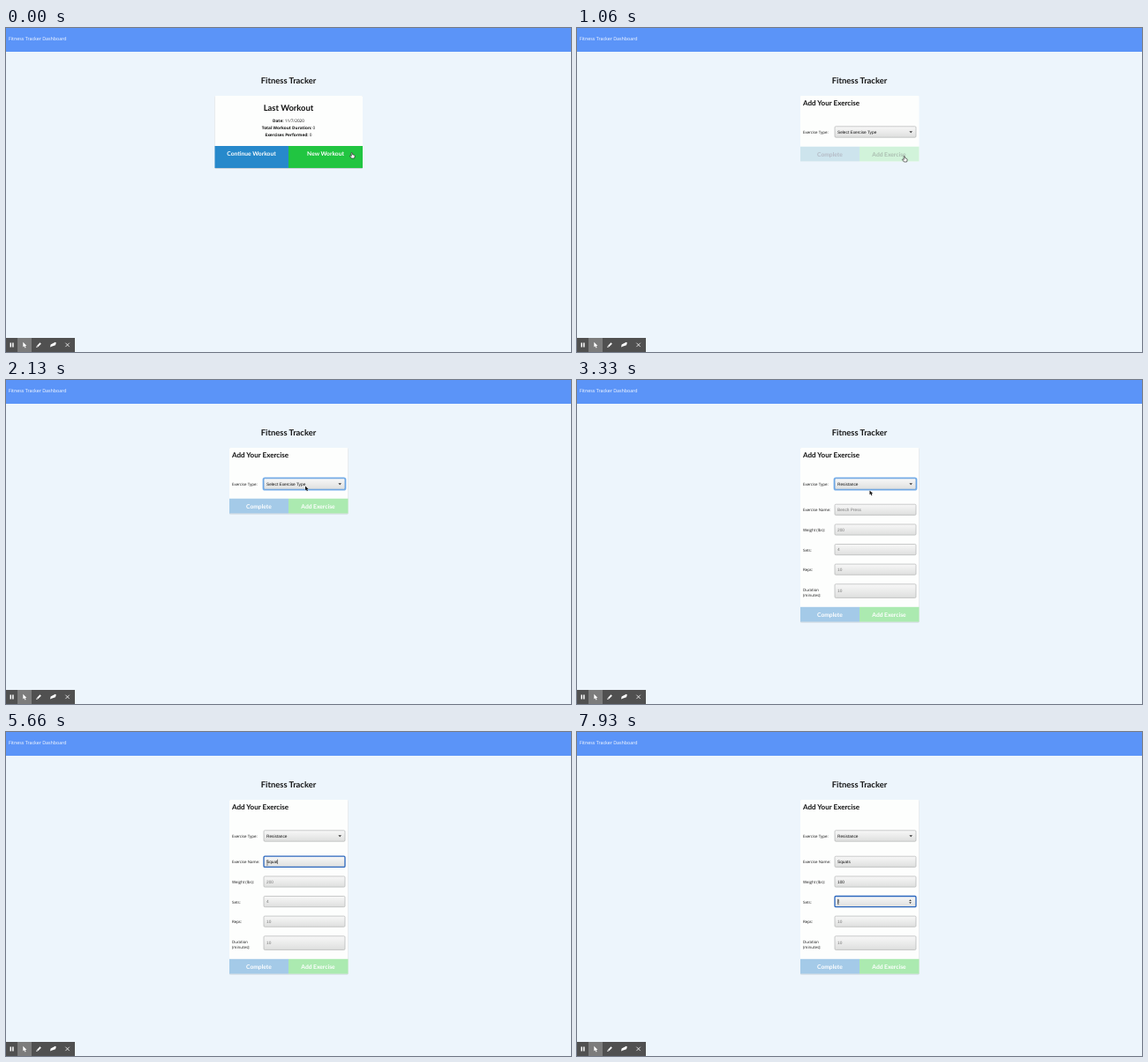
Recreate the animation shown at these times as an HTML page. Size 640 px wide and 368 px high, loop 8 s.

```html
<!DOCTYPE html>
<html lang="en">
<head>
<meta charset="utf-8">
<title>Fitness Tracker</title>
<style>
  html, body { margin: 0; width: 100%; height: 100%; overflow: hidden; background: #edf5fc; }
  svg { display: block; width: 640px; height: 368px; }
  text { font-family: "Open Sans", sans-serif; text-rendering: geometricPrecision; white-space: pre; }
  .head { font-family: Lato, sans-serif; font-weight: 700; fill: #111; }
  .button { font-family: Lato, sans-serif; font-weight: 700; font-size: 6.7px; text-anchor: middle; fill: #fff; }
  .field { font-family: "Liberation Sans", Arial, sans-serif; font-size: 4.75px; }
  .label { font-size: 4.4px; fill: #111; }
  .info { font-size: 4.7px; text-anchor: middle; fill: #111; }
  .bold { font-weight: 700; }
</style>
</head>
<body>
<svg id="stage" viewBox="0 0 640 368">
  <defs>
    <linearGradient id="inputFill" x1="0" y1="0" x2="0" y2="1">
      <stop offset="0" stop-color="#f8f8f8"/><stop offset="1" stop-color="#dedfde"/>
    </linearGradient>
    <filter id="shadow" x="-10%" y="-10%" width="120%" height="125%">
      <feDropShadow dx="0" dy="0.5" stdDeviation="0.7" flood-color="#8c949c" flood-opacity="0.75"/>
    </filter>
  </defs>
  <rect width="640" height="368" fill="#edf5fc"/>
  <rect width="640" height="27" fill="#5b94f8"/>
  <text x="3" y="13.9" font-size="5.33" fill="#fff">Fitness Tracker Dashboard</text>
  <text class="head" x="320" y="62.8" font-size="9.4" text-anchor="middle">Fitness Tracker</text>
  <g id="summary"></g>
  <g id="form"></g>
  <g id="toolbar">
    <rect y="352" width="78" height="16" fill="#505050"/>
    <rect x="13" y="352" width="16" height="16" fill="#7c7c7c"/>
    <path d="M5.3 357.6v4.8M7.9 357.6v4.8" stroke="#fff" stroke-width="1.5"/>
    <path d="M19.3 356.8v5.6l1.3-1.1 1 2.2 1-.5-1-2.1h1.8z" fill="#fff"/>
    <path d="M35.6 361.6l3.6-3.6" stroke="#fff" stroke-width="1.8"/>
    <path d="M34.2 363l.5-1.8 1.3 1.3z" fill="#fff"/>
    <path d="M50 362.6l.6-3.2 5.2-2.6 1 .8-.8 2.6-4.4 1.6z" fill="#fff"/>
    <path d="M67.4 357.7l4.4 4.4M71.8 357.7l-4.4 4.4" stroke="#fff" stroke-width=".8"/>
  </g>
  <g id="cursor">
    <path id="hand" d="M-.9-3.2q.8-.7 1.2.2l.3 1.8 1.8.5q.9.4.7 1.5l-.5 2.2H-.6L-2.5.6q-.1-.9.9-.6l.9.6z"
      fill="#fff" stroke="#222" stroke-width=".65"/>
    <path id="arrow" d="M0 0v4.7l1.1-.9.8 1.9 1-.4-.8-1.9h1.5z" fill="#111" stroke="#fff" stroke-width=".35"
      paint-order="stroke"/>
    <path id="beam" d="M-.9-2.8q.9 0 .9.6q0-.6.9-.6M0-2.2v4.4M-.9 2.8q.9 0 .9-.6q0 .6.9.6"
      fill="none" stroke="#555" stroke-width=".5"/>
  </g>
</svg>
<script>
const LOOP = 8000, FORM_AT = 1060, CHOSEN_AT = 3330;
const NAME_FOCUS = 4130, WEIGHT_FOCUS = 6260, SETS_FOCUS = 7500;
const $ = id => document.getElementById(id);

function add(parent, tag, attrs, content = '') {
  const node = document.createElementNS('http://www.w3.org/2000/svg', tag);
  for (const key in attrs) node.setAttribute(key, attrs[key]);
  node.textContent = content;
  return parent.appendChild(node);
}
const show = (node, on) => node.setAttribute('display', on ? 'inline' : 'none');
const rect = (parent, x, y, width, height, fill, more = {}) =>
  add(parent, 'rect', { x, y, width, height, fill, ...more });
const text = (parent, cls, x, y, content, more = {}) =>
  add(parent, 'text', { class: cls, x, y, ...more }, content);

// Last workout card
const summary = $('summary');
rect(summary, 236.5, 77, 167.5, 82, '#fdfefd', { rx: 1, filter: 'url(#shadow)' });
text(summary, 'head', 320, 94.4, 'Last Workout', { 'text-anchor': 'middle', 'font-size': 9.4 });
[['Date', '11/7/2020'], ['Total Workout Duration', '0'], ['Exercises Performed', '0']].forEach(([key, value], i) => {
  const line = text(summary, 'info', 320, 106.8 + i * 8, '');
  add(line, 'tspan', { class: 'bold' }, key + ':');
  add(line, 'tspan', {}, ' ' + value);
});
rect(summary, 236.5, 134, 83.5, 25, '#2789cb');
rect(summary, 320, 134, 84, 25, '#21c541');
text(summary, 'button', 278, 145.3, 'Continue Workout');
text(summary, 'button', 362, 145.3, 'New Workout');

// Exercise form
const form = $('form');
const card = rect(form, 253, 77, 134.5, 74.5, '#fdfefd', { rx: 1 });
text(form, 'head', 256, 88.3, 'Add Your Exercise', { 'font-size': 8.05 });

function makeField(parent, y, height, labels, placeholder) {
  const mid = y + height / 2;
  labels.forEach((label, i) => text(parent, 'label', 256, mid + (labels.length > 1 ? .3 : 2.1) + i * 6, label));
  const glow = rect(parent, 291.6, y - .4, 92.8, height + .8, 'none',
    { rx: 1.6, stroke: '#7db4ee', 'stroke-width': 2 });
  const box = rect(parent, 292, y, 92, height, 'url(#inputFill)', { rx: 1.2 });
  const value = text(parent, 'field', 295, mid + 1.7, placeholder);
  const caret = rect(parent, 295, mid - 2.7, .5, 5.4, '#111');
  const spin = add(parent, 'path', {
    d: `M376.2 ${mid - .6}l1.3-1.7 1.3 1.7zM376.2 ${mid + .6}l1.3 1.7 1.3-1.7z`, fill: '#333'
  });
  return { glow, box, value, caret, spin, placeholder };
}

function setField(field, typed, ring, caretOn = false, spinOn = false) {
  field.value.textContent = typed || field.placeholder;
  field.value.setAttribute('fill', typed ? '#111' : '#777');
  field.box.setAttribute('stroke', ring === 'strong' ? '#2a66bd' : ring ? '#4c8fd6' : '#b3b5b5');
  field.box.setAttribute('stroke-width', ring === 'strong' ? 1.3 : .7);
  show(field.glow, ring === 'soft');
  show(field.caret, caretOn);
  show(field.spin, spinOn);
  if (caretOn) field.caret.setAttribute('x', 295.1 + (typed ? field.value.getComputedTextLength() : 0));
}

const select = makeField(form, 111.8, 12.4, ['Exercise Type:'], '');
add(form, 'path', { d: 'M376.4 117.3h3.6l-1.8 2z', fill: '#333' });
const details = add(form, 'g', {});
const [nameField, weight, sets, reps, duration] = [
  [141.2, 12.2, ['Exercise Name:'], 'Bench Press'],
  [163.9, 12.2, ['Weight (lbs):'], '200'],
  [186.5, 12.2, ['Sets:'], '4'],
  [209.1, 12.2, ['Reps:'], '10'],
  [231.8, 15.6, ['Duration', '(minutes):'], '10']
].map(spec => makeField(details, ...spec));

const buttons = add(form, 'g', {});
const complete = rect(buttons, 253, 134.7, 67, 16.8, '');
const addButton = rect(buttons, 320, 134.7, 67.5, 16.8, '');
const captions = [
  text(buttons, 'button', 286.5, 145.6, 'Complete'),
  text(buttons, 'button', 353.5, 145.6, 'Add Exercise')
];

const clamp = v => Math.max(0, Math.min(1, v));
const mix = (from, to, k) => `rgb(${from.map((c, i) => Math.round(c + (to[i] - c) * k))})`;
const typedAt = (t, word, times) => word.slice(0, times.filter(at => t >= at).length);

// time, x, y; two entries at the same time make a jump
const track = [
  [60, 392, 145], [800, 371, 149], [1400, 371, 149], [2060, 339, 120.5],
  [CHOSEN_AT, 339, 120.5], [CHOSEN_AT, 331.5, 125.5], [NAME_FOCUS - 60, 296, 148.5],
  [5860, 296, 148.5], [6200, 296, 171], [7060, 296, 171], [7440, 296, 193]
];

function cursorAt(t) {
  const next = track.findIndex(p => p[0] > t);
  if (next === 0) return track[0].slice(1);
  if (next < 0) return track[track.length - 1].slice(1);
  const [t0, x0, y0] = track[next - 1], [t1, x1, y1] = track[next];
  const k = (t - t0) / (t1 - t0), ease = k * k * (3 - 2 * k);
  return [x0 + (x1 - x0) * ease, y0 + (y1 - y0) * ease];
}

function drawForm(t) {
  const chosen = t >= CHOSEN_AT, fade = clamp((t - FORM_AT) / 200);
  card.setAttribute('height', chosen ? 197.5 : 74.5);
  if (fade > .2) card.setAttribute('filter', 'url(#shadow)');
  else card.removeAttribute('filter');
  buttons.setAttribute('transform', `translate(0 ${chosen ? 123.1 : 0})`);
  complete.setAttribute('fill', mix([205, 228, 237], [164, 202, 232], fade));
  addButton.setAttribute('fill', mix([209, 243, 218], [171, 234, 176], fade));
  captions.forEach((caption, i) =>
    caption.style.fill = mix(i ? [171, 190, 177] : [181, 187, 198], [255, 255, 255], fade));

  setField(select, chosen ? 'Resistance' : 'Select Exercise Type', t >= 2060 && t < NAME_FOCUS ? 'soft' : '');
  show(details, chosen);
  if (!chosen) return;

  const nameKeys = [4930, 5130, 5260, 5400, 5530, 5730], weightKeys = [6600, 6730, 6860];
  const active = t >= SETS_FOCUS ? sets : t >= WEIGHT_FOCUS ? weight : t >= NAME_FOCUS ? nameField : null;
  const last = Math.max(...[NAME_FOCUS, WEIGHT_FOCUS, SETS_FOCUS, ...nameKeys, ...weightKeys].filter(at => at <= t));
  const caretOn = (t - last) % 1000 < 500;
  const update = (field, typed) => setField(field, typed, field === active ? 'strong' : '',
    field === active && caretOn, field === active && field !== nameField);
  update(nameField, typedAt(t, 'Squats', nameKeys));
  update(weight, typedAt(t, '100', weightKeys));
  [sets, reps, duration].forEach(field => update(field, ''));
}

function draw(t) {
  show(summary, t < FORM_AT);
  show(form, t >= FORM_AT);
  if (t >= FORM_AT) drawForm(t);
  const [x, y] = cursorAt(t);
  $('cursor').setAttribute('transform', `translate(${x} ${y})`);
  const onButton = t < CHOSEN_AT && y > 135, onInput = t > CHOSEN_AT && y > 141;
  show($('hand'), onButton);
  show($('beam'), onInput);
  show($('arrow'), !onButton && !onInput);
}

const start = performance.now();
function tick() {
  draw((performance.now() - start) % LOOP);
  requestAnimationFrame(tick);
}
tick();
</script>
</body>
</html>
```
